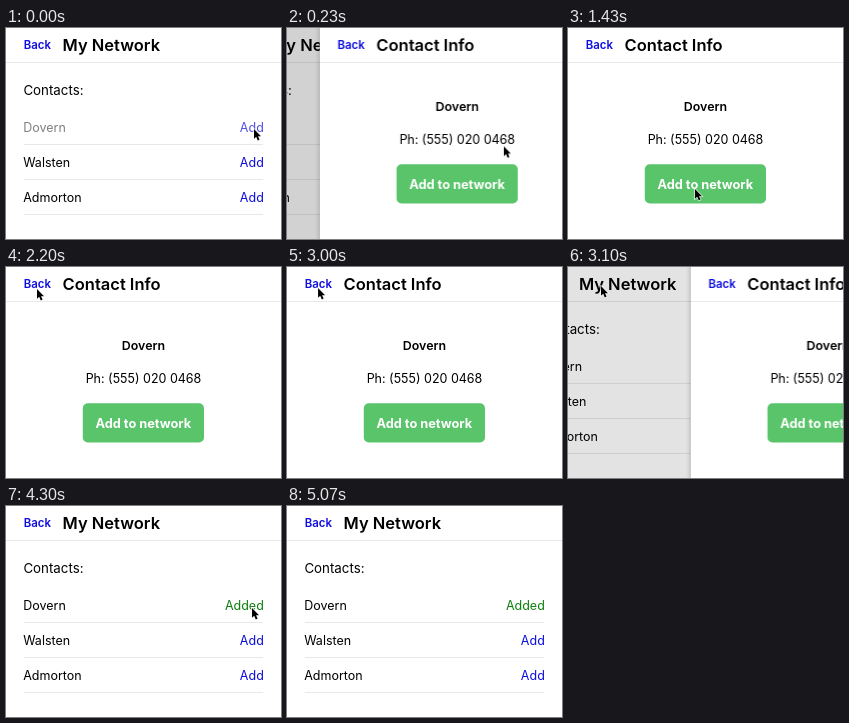
An HTML page for the animation above (5.31 s loop, 275 px wide and 211 px high).

```html
<!DOCTYPE html>
<html lang="en">
<head>
<meta charset="utf-8">
<title>My Network</title>
<style>
  html, body { margin: 0; width: 100%; height: 100%; overflow: hidden; background: #fff; }
  svg { display: block; width: 100vw; height: 100vh; }
  text { font: 400 12.5px Inter, "Noto Sans", sans-serif; fill: #000; }
  .title { font-size: 16.5px; font-weight: 600; }
  .back { font-size: 11.4px; font-weight: 600; fill: #0d0de2; }
  .heading { font-size: 13.3px; }
  .action { text-anchor: end; fill: #0d0dde; }
  .added { fill: #0b800b; }
  .mid { text-anchor: middle; }
  .name { font-weight: 600; font-size: 12.4px; }
  .label { font-weight: 700; font-size: 12.8px; fill: #fff; }
  .rule { stroke: #e8e8e8; stroke-width: 1; }
</style>
</head>
<body>
<svg viewBox="0 0 275 211">
  <defs>
    <linearGradient id="edge">
      <stop offset="0" stop-color="#000" stop-opacity="0"/>
      <stop offset=".7" stop-color="#000" stop-opacity=".06"/>
      <stop offset="1" stop-color="#000" stop-opacity=".25"/>
    </linearGradient>
  </defs>

  <g id="list">
    <rect width="275" height="211" fill="#fff"/>
    <text class="back" x="17.8" y="21.4">Back</text>
    <text class="title" x="56.6" y="23">My Network</text>
    <path class="rule" d="M0 34.5H275"/>
    <text class="heading" x="17.4" y="66.7">Contacts:</text>
    <g id="rows"></g>
  </g>
  <rect id="dim" width="275" height="211" opacity="0"/>

  <g id="card">
    <rect x="-5" width="5" height="211" fill="url(#edge)"/>
    <rect width="275" height="211" fill="#fff"/>
    <text class="back" id="back" x="17.8" y="21.4">Back</text>
    <text class="title" x="56.6" y="23">Contact Info</text>
    <path class="rule" d="M0 34.5H275"/>
    <text class="mid name" x="137.5" y="82.8">Dovern</text>
    <text class="mid" x="137.5" y="116">Ph: (555) 020 0468</text>
    <g id="button">
      <rect x="76.8" y="136.2" width="121.2" height="39.2" rx="5" fill="#5ac46b"/>
      <text class="mid label" x="137.3" y="160.9">Add to network</text>
    </g>
  </g>

  <path id="cursor" d="M0 0V9.8L2.2 7.8L3.8 11.4L5.6 10.6L4 7.2H7Z"
        fill="#000" stroke="#fff" stroke-width="1.2" paint-order="stroke"/>
</svg>
<script>
  const LOOP = 5310;
  const SLIDE = "cubic-bezier(.32,.72,0,1)";
  const PUSH = [45, 595], POP = [3020, 3570];
  const $ = id => document.getElementById(id);

  // Contact rows; only the first one changes state.
  $("rows").innerHTML = ["Dovern", "Walsten", "Admorton"].map((name, i) => {
    const y = 103.7 + 35 * i;
    const added = i ? "" : `<text class="action added" id="added" x="257.8" y="${y}">Added</text>`;
    return `<text id="name${i}" x="17.2" y="${y}">${name}</text>
      <text class="action" id="add${i}" x="257.8" y="${y}">Add</text>${added}
      <path class="rule" d="M18 ${y + 12.8}H257"/>`;
  }).join("");

  // steps: [time, value, easing to the next step]
  function track(id, prop, steps) {
    const all = [...steps];
    if (all[0][0] > 0) all.unshift([0, all[0][1]]);
    const last = all[all.length - 1];
    if (last[0] < LOOP) all.push([LOOP, last[1]]);
    const frames = all.map(([time, value, easing = "linear"]) =>
      ({ offset: time / LOOP, [prop]: value, easing }));
    $(id).animate(frames, { duration: LOOP, iterations: Infinity });
  }

  const shift = x => `translateX(${x}px)`;
  const transition = (id, prop, off, on) => track(id, prop, [
    [PUSH[0], off, SLIDE], [PUSH[1], on], [POP[0], on, SLIDE], [POP[1], off]
  ]);
  const swap = (id, time, from, to) =>
    track(id, "opacity", [[0, from], [time, from], [time, to]]);
  const dip = (id, low, start, bottom, hold, end) => track(id, "opacity", [
    [start, 1, "ease-out"], [bottom, low], [hold, low, "ease-in-out"], [end, 1]
  ]);

  transition("card", "transform", shift(275), shift(0));
  transition("list", "transform", shift(0), shift(-82.5));
  transition("dim", "opacity", 0, .2);
  track("card", "opacity", [[0, 0], [30, 0], [30, 1], [3540, 1], [3540, 0]]);

  track("name0", "opacity", [[0, .5], [30, .5, "ease-out"], [230, 1]]);
  track("add0", "opacity", [[0, .72], [30, .72, "ease-out"], [230, 1], [1700, 1], [1700, 0]]);
  swap("added", 1700, 0, 1);
  dip("button", .55, 1470, 1590, 1640, 1820);
  dip("back", .5, 2430, 2540, 2580, 2770);

  const at = (x, y) => `translate(${x}px, ${y}px)`;
  track("cursor", "transform", [
    [0, at(248, 101)],
    [60, at(247, 102), "ease-in-out"],
    [500, at(151, 154), "ease-out"],
    [1000, at(129, 160)],
    [1430, at(127, 161)],
    [1720, at(127, 161), "ease-in-out"],
    [2170, at(31, 22)],
    [2430, at(31, 22)],
    [2770, at(31, 21)],
    [3000, at(31, 21)],
    [3100, at(33, 19), "ease-in"],
    [3470, at(93, 66), "ease-out"],
    [4070, at(245, 101)],
    [4130, at(246, 102)],
    [4300, at(246, 102), "ease-in-out"],
    [4550, at(240, 104), "ease-in-out"],
    [4830, at(248, 101), "ease-in"],
    [5070, at(276, 88)]
  ]);
  swap("cursor", 5060, 1, 0);
</script>
</body>
</html>
```
